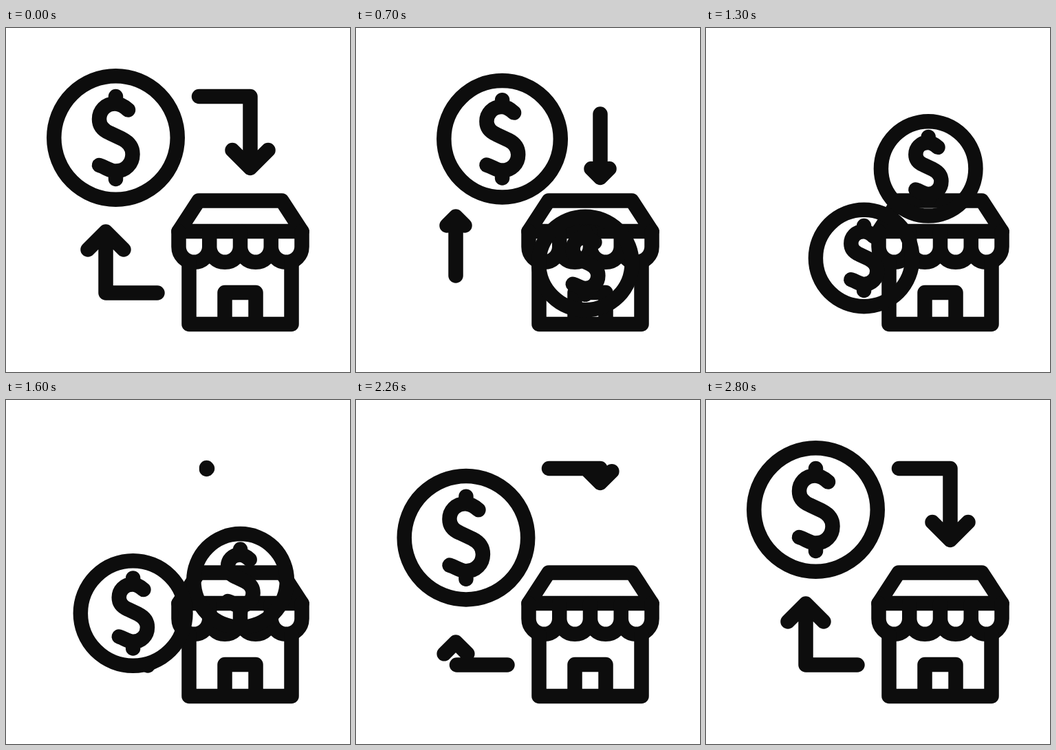
An HTML page for the animation above (3000 ms loop, 500x500 px).

```html
<!DOCTYPE html>
<html lang="en">
<head>
<meta charset="utf-8">
<title>Money and shop cycle</title>
<style>
html, body { margin: 0; width: 100%; height: 100%; overflow: hidden; background: #fff; }
svg { display: block; width: 500px; height: 500px; }
svg * { fill: none; stroke: #0d0d0d; stroke-linecap: round; stroke-linejoin: round; }
#shop, .arrow { stroke-width: 21.5; }
.track { visibility: hidden; }
</style>
</head>
<body>
<svg viewBox="0 0 500 500">
  <defs>
    <g id="coin">
      <circle r="89.75"/>
      <path d="M18 -40.500C11 -47 4 -49.500 -1 -49.500C-15 -49.500 -24 -39 -24 -27C-24 -16 -17 -10.500 -9 -7L9 1.500C18 6 24.500 13 24.500 24C24.500 38 14 48.500 0 48.500C-9 48.500 -14 43 -24 40M0 -60V-50M0 49V60"/>
    </g>
  </defs>
  <path class="track" id="outTrack" d="M159.500 159.500C351 159.500 342 216 342 342"/>
  <path class="track" id="backTrack" d="M342 342C174.500 342 159.500 327 159.500 159.500"/>
  <g id="shop">
    <path d="M280 251H401L430 295.500H251Z"/>
    <path d="M251 295.500V318a22.375 22.375 0 0 0 44.750 0a22.375 22.375 0 0 0 44.750 0a22.375 22.375 0 0 0 44.750 0a22.375 22.375 0 0 0 44.750 0V295.500M295.750 296V318M340.500 296V318M385.250 296V318"/>
    <path d="M266 340V430.500H415V340M318 430V384.500H363V430"/>
  </g>
  <path class="arrow" id="downArrow"/>
  <path class="arrow" id="upArrow"/>
  <use href="#coin" id="outCoin"/>
  <use href="#coin" id="backCoin"/>
</svg>
<script>
const LOOP = 3000, STEP = 20, STROKE = 21.5, SMALL = 0.755;
const $ = id => document.getElementById(id);

// Piecewise linear value from [time, value] keys, held at both ends.
function tween(t, ...keys) {
  if (t <= keys[0][0]) return keys[0][1];
  for (let i = 1; i < keys.length; i++) {
    const [t0, v0] = keys[i - 1], [t1, v1] = keys[i];
    if (t < t1) return v0 + (v1 - v0) * (t - t0) / (t1 - t0);
  }
  return keys[keys.length - 1][1];
}

function placeCoin(coin, track, progress, scale, visible) {
  const p = track.getPointAtLength(track.getTotalLength() * progress);
  coin.setAttribute("transform", `translate(${p.x} ${p.y}) scale(${scale})`);
  coin.setAttribute("stroke-width", STROKE / scale);
  coin.style.strokeWidth = STROKE / scale;
  coin.style.display = visible ? "" : "none";
}

const arrows = [
  { el: $("downArrow"), x: 280.5, y: 99.5, dir: 1, side: 74.5, len: 178.5, over: 28,
    tip: [[1505, 0], [1980, 60], [2100, 74], [2260, 95.5], [2700, 178.5]],
    turn: [[2030, 0], [2170, 90]] },
  { el: $("upArrow"), x: 220, y: 385, dir: -1, side: 75, len: 164, over: 44,
    tip: [[1505, 0], [1985, 75], [2260, 108], [2720, 164]],
    turn: [[1990, 0], [2120, 90]] }
];

// Point at a distance along the bent arrow shaft.
function along(a, d) {
  return [a.x + a.dir * Math.min(d, a.side), a.y + a.dir * Math.max(0, d - a.side)];
}

function shaft(a, from, to) {
  if (to <= from) return "";
  const pts = [along(a, from)];
  if (from < a.side && to > a.side) pts.push(along(a, a.side));
  pts.push(along(a, to));
  return "M" + pts.join("L");
}

function head(a, d, scale, turn) {
  const [x, y] = along(a, d);
  const angle = turn * Math.PI / 180;
  const c = Math.cos(angle) * a.dir * 26 * scale;
  const s = Math.sin(angle) * a.dir * 26 * scale;
  return `M${x - c - s} ${y - s + c}L${x} ${y}L${x - c + s} ${y - s - c}`;
}

function drawArrow(a, t) {
  let d = "";
  if (t < 1200) {
    const k = tween(t, [200, 0], [1200, 1]);
    const tip = a.len + a.over * k;
    d = shaft(a, 200 * k, tip) + head(a, tip, 1 - k, 90);
  } else if (t >= 1560) {
    const tip = tween(t, ...a.tip);
    const drawn = tween(t, [2000, 0], [2580, a.len]);
    d = shaft(a, 0, Math.min(tip, drawn)) +
        head(a, tip, tween(t, [1560, 0], [2640, 1]), tween(t, ...a.turn));
  }
  a.el.setAttribute("d", d);
}

function frame() {
  const t = Math.floor(performance.now() % LOOP / STEP) * STEP;
  placeCoin($("outCoin"), $("outTrack"),
    tween(t, [440, 0], [1990, 1]), tween(t, [512, 1], [1337, SMALL]), t < 2000);
  placeCoin($("backCoin"), $("backTrack"),
    tween(t, [650, 0], [2494, 1]), tween(t, [1180, SMALL], [2260, 1]), t >= 640);
  arrows.forEach(a => drawArrow(a, t));
  requestAnimationFrame(frame);
}
frame();
</script>
</body>
</html>
```
